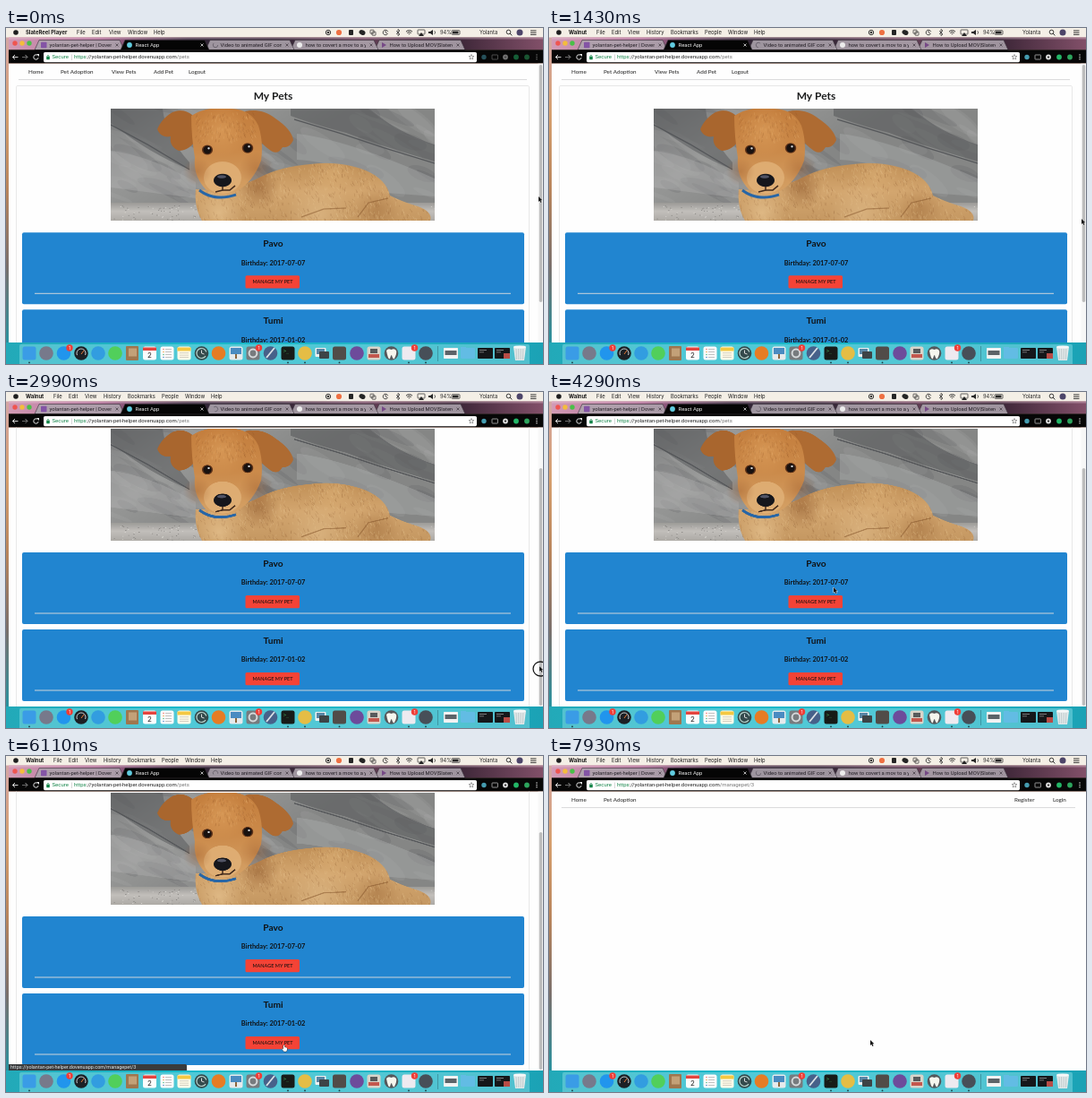
Write an HTML page with a canvas that moves like this. It is 600 by 375 pixels and loops after 8 s.

```html
<!DOCTYPE html>
<html lang="en">
<head>
<meta charset="utf-8">
<title>My Pets</title>
<style>
html, body { margin: 0; width: 100%; height: 100%; overflow: hidden; background: #fff; }
canvas { display: block; width: 600px; height: 375px; }
</style>
</head>
<body>
<canvas id="stage"></canvas>
<script>
const W = 600, H = 375, LOOP = 8000, STEP = 130;
const stage = document.getElementById('stage');
const dpr = window.devicePixelRatio || 1;
stage.width = W * dpr;
stage.height = H * dpr;
let c = stage.getContext('2d');

const UI = 'Inter, "Open Sans", sans-serif';
const WEB = 'Roboto, Arial, sans-serif';
const LATO = 'Lato, sans-serif';
const HOST = 'https://yolantan-pet-helper.dovenuapp.com';

function rect(x, y, w, h, fill) { c.fillStyle = fill; c.fillRect(x, y, w, h); }
function round(x, y, w, h, r, fill, stroke) {
  c.beginPath();
  c.roundRect(x, y, w, h, r);
  if (fill) { c.fillStyle = fill; c.fill(); }
  if (stroke) { c.strokeStyle = stroke; c.lineWidth = 0.7; c.stroke(); }
}
function dot(x, y, r, fill) {
  c.fillStyle = fill;
  c.beginPath();
  c.arc(x, y, r, 0, 7);
  c.fill();
}
function oval(x, y, rx, ry, turn, fill) {
  c.fillStyle = fill;
  c.beginPath();
  c.ellipse(x, y, rx, ry, turn, 0, 7);
  c.fill();
}
function line(pts, color, w = 1) {
  c.strokeStyle = color;
  c.lineWidth = w;
  c.beginPath();
  for (let i = 0; i < pts.length; i += 2) c.lineTo(pts[i], pts[i + 1]);
  c.stroke();
}
function arc(x, y, r, from, to, color, w = 1) {
  c.strokeStyle = color;
  c.lineWidth = w;
  c.beginPath();
  c.arc(x, y, r, from, to);
  c.stroke();
}
function shape(path, fill) { c.fillStyle = fill; c.fill(new Path2D(path)); }
function text(s, x, y, font, color, align = 'left') {
  c.font = font;
  c.fillStyle = color;
  c.textAlign = align;
  c.textBaseline = 'middle';
  c.fillText(s, x, y);
  return c.measureText(s).width;
}
function blend(x0, y0, x1, y1, ...colors) {
  const g = c.createLinearGradient(x0, y0, x1, y1);
  colors.forEach((k, i) => g.addColorStop(i / (colors.length - 1), k));
  return g;
}
function glow(x, y, r, rgb, a) {
  const g = c.createRadialGradient(x, y, 0, x, y, r);
  g.addColorStop(0, `rgba(${rgb},${a})`);
  g.addColorStop(1, `rgba(${rgb},0)`);
  rect(x - r, y - r, 2 * r, 2 * r, g);
}

// Puppy picture, painted once
function paintPhoto() {
  const pic = document.createElement('canvas'), k = 2;
  pic.width = 362 * k;
  pic.height = 125 * k;
  const main = c;
  c = pic.getContext('2d');
  c.scale(k, k);
  c.translate(-117, -90);
  let seed = 11;
  const rnd = () => (seed = seed * 16807 % 2147483647) / 2147483647;

  rect(117, 90, 362, 125, blend(117, 90, 200, 215, '#777879', '#969796', '#858685'));
  for (let i = 0; i < 80; i++) {
    const tone = rnd() < 0.5 ? '65,66,68' : '186,187,187';
    oval(117 + rnd() * 362, 90 + rnd() * 105, 10 + rnd() * 25, 2 + rnd() * 7, 0.15 + rnd() * 0.6, `rgba(${tone},.13)`);
  }
  shape('M117 90L175 90Q178 120 205 150L205 158Q160 140 117 106Z', 'rgba(90,91,94,.55)');
  shape('M117 137Q160 142 212 172L212 190L117 178Z', 'rgba(175,176,175,.4)');
  shape('M318 90L405 90Q440 118 479 130L479 149Q420 132 380 117Q345 108 318 98Z', 'rgba(80,82,85,.5)');
  shape('M325 118Q380 124 479 168L479 188L425 184Q380 150 325 147Z', 'rgba(172,174,174,.4)');
  line([117, 108, 158, 130, 205, 158], '#55575a', 1.3);
  line([322, 102, 375, 118, 420, 133, 479, 151], '#55575a', 1.3);
  line([405, 90, 440, 117, 479, 131], '#6a6b6d', 1);
  rect(117, 195, 362, 20, blend(0, 194, 0, 215, '#979693', '#c2bfbb', '#aeaba6'));
  for (let i = 0; i < 260; i++) rect(117 + rnd() * 362, 197 + rnd() * 18, 1.2, 0.8, rnd() < 0.5 ? '#d8d6d2' : '#858380');

  const body = 'M212 180Q210 200 219 215L474 215Q477 205 460 199Q443 194 429 187Q425 169 402 159Q373 148 340 152Q306 155 285 166Q250 184 212 180Z';
  shape(body, blend(0, 150, 0, 215, '#c08f56', '#d3a66f', '#c59862'));
  c.save();
  c.clip(new Path2D(body));
  glow(238, 206, 27, '230,194,143', 0.75);
  glow(282, 178, 24, '135,80,36', 0.5);
  glow(350, 209, 38, '230,195,145', 0.55);
  glow(415, 203, 27, '157,105,56', 0.45);
  glow(365, 163, 28, '222,178,120', 0.55);
  for (let i = 0; i < 850; i++) {
    const x = 210 + rnd() * 265, y = 150 + rnd() * 65;
    line([x, y, x + rnd() * 4 - 1, y + 2 + rnd() * 3], rnd() < 0.5 ? 'rgba(235,203,153,.35)' : 'rgba(130,82,40,.25)', 0.6);
  }
  c.restore();
  line([330, 211, 355, 202, 380, 201], 'rgba(130,82,40,.5)', 1.2);
  line([427, 190, 405, 195, 393, 211], 'rgba(130,82,40,.5)', 1.2);

  shape('M208 97Q198 89 186 94Q174 101 169 113Q173 123 184 121Q182 132 193 137Q205 137 214 123Z', '#a9662e');
  shape('M267 93Q286 89 301 101Q319 113 321 125Q317 134 309 133Q304 142 296 137Q283 128 278 117Z', '#ae6b32');
  shape('M207 98Q224 87 247 90Q273 89 282 109Q288 127 285 148Q276 172 258 182Q241 191 223 180Q209 165 211 145Q207 120 207 98Z', blend(0, 90, 0, 185, '#c47e3d', '#cb8a4a', '#d5a267'));
  glow(241, 115, 28, '222,160,93', 0.65);
  oval(242, 167, 21, 18, 0, 'rgba(225,177,119,.85)');
  glow(214, 160, 16, '159,92,43', 0.4);
  glow(280, 157, 19, '159,92,43', 0.4);
  oval(225, 136, 6, 5.4, 0, '#5d3219');
  oval(270, 134, 6.2, 5.6, 0, '#5d3219');
  dot(225, 136, 4.5, '#18110f');
  dot(270, 134, 4.7, '#18110f');
  dot(226.5, 134.3, 1.2, '#d7d9dc');
  dot(271.5, 132.3, 1.2, '#d7d9dc');
  oval(242, 170, 10, 7.3, 0, '#15161c');
  oval(241, 166, 5, 1.8, 0, '#515465');
  line([242, 177, 242, 181, 234, 183], '#432b1d', 1.5);
  line([242, 181, 250, 181, 256, 176], '#432b1d', 1.5);
  for (let i = 0; i < 190; i++) {
    const x = 213 + rnd() * 65, y = 94 + rnd() * 32;
    line([x, y, x + (x - 242) * 0.05, y + 3], rnd() < 0.5 ? 'rgba(237,190,125,.3)' : 'rgba(135,76,32,.25)', 0.6);
  }
  c.strokeStyle = '#2866a6';
  c.lineWidth = 3;
  c.stroke(new Path2D('M216 181Q233 194 257 186'));
  c = main;
  return pic;
}
const photo = paintPhoto();

function menuBar(front) {
  rect(0, 0, W, 10.5, '#f4efe6');
  dot(11, 5, 2.8, '#1d1d1d');
  const items = front
    ? [['File', 53], ['Edit', 70], ['View', 88], ['History', 109], ['Bookmarks', 136], ['People', 174], ['Window', 200], ['Help', 229]]
    : [['File', 79], ['Edit', 96], ['View', 115], ['Window', 136], ['Help', 165]];
  text(front ? 'Walnut' : 'SlateReel Player', 22, 5.3, `bold 5.9px ${UI}`, '#151515');
  for (const [s, x] of items) text(s, x, 5.3, `5.8px ${UI}`, '#1c1c1c');
  const ink = '#252525';
  arc(360, 5, 2.7, 0, 7, ink, 0.9);
  dot(360, 5, 1.3, ink);
  dot(372, 5, 3.1, '#ee7042');
  round(383, 2, 5, 6, 1, ink);
  oval(398, 5, 3.6, 2.7, 0.4, ink);
  round(407, 2.2, 4, 4, 0.5, null, ink);
  round(409, 4.2, 4, 4, 0.5, null, ink);
  arc(424, 5, 2.8, 0.4, 6, ink, 0.8);
  line([424, 3, 424, 5, 426, 6], ink, 0.7);
  line([436, 3.2, 440, 7, 438, 8.6, 438, 1.4, 440, 3, 436, 7], ink, 0.7);
  for (let r = 1; r < 6; r += 2) arc(450.5, 7.7, r, -2.35, -0.8, ink, 1);
  round(460, 2, 8, 5, 0.7, null, ink);
  shape('M464 5L467 9L461 9Z', ink);
  shape('M472 4L474 4L477 2L477 8L474 6L472 6Z', ink);
  arc(477, 5, 2.5, -0.8, 0.8, ink, 0.7);
  text('94%', 485, 5.3, `5.7px ${UI}`, ink);
  round(498, 2.7, 9, 4.6, 0.8, null, ink);
  rect(499, 3.6, 6.5, 2.8, ink);
  text('Yolanta', 529, 5.3, `5.8px ${UI}`, ink);
  arc(561.5, 4.5, 2.3, 0, 7, ink, 0.9);
  line([563.2, 6.2, 565.3, 8.4], ink, 1);
  dot(574, 5, 3.5, '#4d4569');
  for (let i = 0; i < 3; i++) rect(586, 2.5 + i * 2.2, 6.5, 0.9, ink);
}

function tab(x, w, label, active) {
  c.beginPath();
  c.moveTo(x - 2, 24.5);
  c.lineTo(x + 3, 13.5);
  c.lineTo(x + w - 3, 13.5);
  c.lineTo(x + w + 2, 24.5);
  c.closePath();
  c.fillStyle = active ? '#050505' : 'rgba(174,164,174,.88)';
  c.fill();
  c.strokeStyle = '#383039';
  c.lineWidth = 0.6;
  c.stroke();
  c.save();
  c.beginPath();
  c.rect(x, 12, w - 12, 13);
  c.clip();
  text(label, x + 14.5, 19, `5.9px ${WEB}`, active ? '#f0f0f0' : '#211c23');
  c.restore();
  const k = active ? '#ddd' : '#494149', cx = x + w - 6;
  line([cx - 1.5, 17.5, cx + 1.5, 20.5], k, 0.8);
  line([cx + 1.5, 17.5, cx - 1.5, 20.5], k, 0.8);
}

function browserBar(t, front, loading, path) {
  rect(3, 10.5, 597, 14, blend(3, 0, 600, 0, '#d29bb5', '#ae6b94', '#342738', '#302433', '#654057', '#392435', '#825069'));
  rect(3, 10.5, 597, 2, 'rgba(236,203,220,.35)');
  ['#ef5550', '#f4bc3c', '#4abf48'].forEach((k, i) => dot(10 + i * 8, 17, 2.7, k));
  tab(414, 97, 'How to Upload MOV|Slatereel');
  tab(320, 94, 'how to covert a mov to a youtube');
  tab(225, 95, 'Video to animated GIF converter');
  tab(34, 96, 'yolantan-pet-helper | Dovenu');
  tab(130, 95, 'React App', true);
  round(39, 15.8, 6.5, 6.5, 0.8, '#8454a5');
  if (loading) arc(138, 19, 2.7, t / 130, t / 130 + 4.1, '#e7e7e7', 1);
  else dot(138, 19, 2.9, '#61cce0');
  arc(234, 19, 2.7, t / 180, t / 180 + 4, '#68616c', 0.9);
  dot(328, 19, 3, '#ececec');
  shape('M420 16L425 19L420 22Z', '#764986');

  rect(3, 24.3, 597, 15.2, '#070707');
  line([13.5, 32.5, 7.5, 32.5, 10, 30, 7.5, 32.5, 10, 35], '#eee', 0.9);
  line([18, 32.5, 24, 32.5, 21.5, 30, 24, 32.5, 21.5, 35], '#777', 0.9);
  if (loading) {
    line([31, 30, 36, 35], '#eee', 0.9);
    line([36, 30, 31, 35], '#eee', 0.9);
  } else {
    arc(33.5, 32.5, 2.7, 0.2, 5.3, '#eee', 0.9);
    shape('M34 29L37 29L37 32Z', '#eee');
  }
  round(42, 27, 484, 11.2, 1.6, '#fff');
  round(45.2, 31.8, 3.6, 3.4, 0.4, '#16854a');
  arc(47, 31.7, 1.2, 3.14, 6.28, '#16854a', 0.7);
  text('Secure', 51.5, 32.7, `6px ${WEB}`, '#16854a');
  rect(73, 29.5, 0.6, 6.5, '#bbb');
  const font = `6px ${WEB}`;
  const w = text('https', 76, 32.7, font, '#16854a');
  const w2 = text(HOST.slice(5), 76 + w, 32.7, font, '#222');
  text(path, 76 + w + w2, 32.7, font, '#777');
  c.beginPath();
  for (let i = 0; i < 10; i++) {
    const a = i * Math.PI / 5 - Math.PI / 2, r = i % 2 ? 1.3 : 3;
    c.lineTo(520 + r * Math.cos(a), 32.5 + r * Math.sin(a));
  }
  c.closePath();
  c.strokeStyle = '#666';
  c.lineWidth = 0.6;
  c.stroke();
  c.globalAlpha = front ? 1 : 0.5;
  dot(534, 32.5, 2.7, '#459cb0');
  round(543, 30, 6.5, 5, 0.6, null, '#ccc');
  dot(558, 32.5, 2.9, '#ddd');
  dot(558, 32.5, 1, '#111');
  dot(570, 32.5, 2.9, '#23b667');
  dot(582, 32.5, 2.9, '#2da45d');
  for (let i = 0; i < 3; i++) dot(593, 30 + i * 2.4, 0.75, '#ddd');
  c.globalAlpha = 1;
}

function card(y, name, born) {
  round(18, y, 561, 80, 2, '#2185d0');
  text(name, 298.5, y + 12.5, `bold 10.2px ${LATO}`, '#101214', 'center');
  text('Birthday: ' + born, 298.5, y + 34, `bold 7.4px ${LATO}`, '#101214', 'center');
  round(267.5, y + 48, 60.5, 14.3, 1.5, '#f44336');
  text('MANAGE MY PET', 298, y + 55.4, `500 5.5px ${LATO}`, '#17100f', 'center');
  rect(32, y + 67.5, 532, 1, '#cdd5dc');
}

function nav(items, right) {
  for (const [s, x] of items) text(s, x, 49, `6.3px ${LATO}`, '#202020');
  rect(14, 57.2, right - 14, 0.9, '#d4d4d5');
}

function page(scroll, blank) {
  c.save();
  c.beginPath();
  c.rect(3, 39.5, 597, 311.5);
  c.clip();
  rect(3, 39.5, 597, 312, '#fefefe');
  if (blank) {
    nav([['Home', 25], ['Pet Adoption', 61], ['Register', 520], ['Login', 563]], 588);
  } else {
    c.translate(0, -scroll);
    nav([['Home', 25], ['Pet Adoption', 61], ['View Pets', 118], ['Add Pet', 165], ['Logout', 204]], 582);
    round(11.5, 64.5, 573, 350, 1.5, null, '#dededf');
    text('My Pets', 298.5, 76.8, `bold 12px ${LATO}`, '#1b1c1d', 'center');
    c.drawImage(photo, 117, 90, 362, 125);
    card(228.3, 'Pavo', '2017-07-07');
    card(314.3, 'Tumi', '2017-01-02');
    c.translate(0, scroll);
    rect(594.5, 39.5, 5.5, 312, '#f7f7f7');
    round(595.8, 41 + scroll * 0.89, 3.4, 265, 1.7, '#bcbcbc');
  }
  c.restore();
}

const sq = (x, k) => round(x - 7.5, 355.5, 15, 15, 2.5, k);
const disc = (x, k) => dot(x, 363, 7.8, k);
function badge(x) {
  dot(x, 357, 3.7, '#ef3d37');
  text('1', x, 357.2, `5px ${UI}`, '#fff', 'center');
}
function dock() {
  rect(0, 351, W, 24, blend(0, 0, 600, 0, '#23a9b8', '#19b9ca', '#20b6c6', '#1ba2b5'));
  round(15, 353, 570, 24, 2, 'rgba(125,216,226,.55)');
  sq(26, '#3a9ce6');
  disc(45, '#77798b');
  disc(64.5, '#2195ed');
  badge(71);
  disc(84, '#1c2025');
  arc(84, 363, 5, 2.7, 6.7, '#cbd0d2', 1);
  line([84, 364, 87, 360], '#e97935', 1);
  disc(103, '#329de0');
  disc(122, '#51cf5b');
  round(134, 355, 14, 16, 1, '#9f764e');
  rect(137, 357.5, 9, 9, '#c3a178');
  sq(160.5, '#fcfcfc');
  rect(153, 356.5, 15, 3.5, '#e4443e');
  text('2', 160.5, 365.5, `8px ${UI}`, '#222', 'center');
  sq(180, '#fbfbfb');
  for (let i = 0; i < 4; i++) {
    dot(176, 358.5 + i * 3, 0.8, ['#e77', '#ea5', '#5b8', '#58c'][i]);
    rect(178, 358 + i * 3, 7, 0.7, '#aaa');
  }
  sq(199, '#fffbe9');
  rect(191.5, 356.5, 15, 4, '#f4c842');
  for (let i = 0; i < 3; i++) rect(194, 362.5 + i * 2.3, 10, 0.6, '#b8b3a6');
  disc(218.5, '#344a4c');
  arc(218.5, 363, 5.5, 0.6, 6, '#b8d5ce', 1.2);
  line([218.5, 359.5, 218.5, 363, 221.5, 364], '#eee', 0.9);
  disc(237.5, '#e67c24');
  sq(257, '#e6eaec');
  rect(251, 357, 12, 7, '#4a8bc1');
  rect(256, 364, 2, 5, '#8c673f');
  sq(276, '#777b7e');
  arc(276, 363, 4.4, 0, 7, '#d5d8da', 2);
  badge(282.5);
  disc(295.5, '#47618a');
  line([291, 368, 300, 357], '#dce2e6', 1.8);
  sq(315, '#171b18');
  text('>_', 310, 360.5, '5px "DejaVu Sans Mono", monospace', '#4cbd67');
  disc(334, '#e5bd45');
  round(345.5, 357, 12, 10, 1, '#f1f1f1');
  rect(347, 358, 9, 6, '#5a87a6');
  round(350, 361, 11, 8, 1, '#3d4447');
  sq(372.5, '#514c48');
  disc(392, '#6d4b9b');
  sq(411, '#d9d4c9');
  rect(405, 364, 12, 4, '#c3574d');
  rect(407, 358, 8, 5, '#585b5c');
  disc(430.5, '#55585b');
  shape('M425 360Q427 357 430.5 359Q434 357 436 360Q437 363 434 369Q432 370 431 365Q430 365 429 369Q427 371 425 360Z', '#f6f6ee');
  sq(450, '#eeeaf0');
  badge(456.5);
  disc(469, '#474f58');
  rect(482.3, 355, 0.7, 17, 'rgba(30,75,82,.55)');
  round(489, 357, 16, 12, 0.7, '#f2f2f2');
  rect(490.5, 360, 13, 5, '#5c6368');
  round(508, 357, 16, 12, 1.2, '#62bce4');
  rect(508, 356, 6, 2, '#62bce4');
  for (const x of [527, 546]) {
    round(x, 357, 17, 12, 0.8, '#15171a');
    rect(x + 2, 359, 8, 0.7, '#aaa');
    rect(x + 2, 361.5, 5, 0.7, '#999');
  }
  rect(556, 363, 7, 6, '#b84c46');
  shape('M567 356L581 356L579 371L569 371Z', '#e2e9ea');
  oval(574, 356, 7, 1.6, 0, '#f6f8f8');
  for (let i = 0; i < 4; i++) line([570 + i * 2.6, 358, 570.5 + i * 2.3, 370], '#aab7b9', 0.6);
  for (const x of [26, 315, 334, 372.5, 450, 469]) dot(x, 373.4, 0.9, '#173d43');
}

// Pointer path: time, x, y
const path = [
  [0, 596, 191], [650, 596, 191], [1300, 596, 216], [1820, 596, 216], [2730, 597, 309],
  [3250, 597, 309], [4160, 319, 221], [4550, 319, 221], [5590, 310, 326],
  [6760, 310, 326], [7410, 360, 320], [LOOP, 360, 320]
];
function pointerAt(t) {
  const i = path.findIndex(p => p[0] > t);
  const [t0, x0, y0] = path[i - 1], [t1, x1, y1] = path[i];
  const u = (t - t0) / (t1 - t0), e = u * u * (3 - 2 * u);
  return [x0 + (x1 - x0) * e, y0 + (y1 - y0) * e];
}
function pointer(x, y, hand, pressed) {
  if (pressed) arc(x, y, 8, 0, 7, '#171717', 1.3);
  c.save();
  c.translate(x - 1, y - 3);
  const p = new Path2D(hand
    ? 'M1 0Q2 -1 2.3 0L2.3 2L4.7 2.6Q5.5 3 5 5L4.3 6.8L1.5 6.8L-.8 4Q-.5 3 .8 4Z'
    : 'M0 0L0 6L1.4 4.7L2.4 7L3.5 6.5L2.5 4.3L4.3 4.3Z');
  c.strokeStyle = hand ? '#222' : '#fff';
  c.lineWidth = 0.9;
  c.stroke(p);
  c.fillStyle = hand ? '#fff' : '#111';
  c.fill(p);
  c.restore();
}

function draw(t) {
  const front = t >= 650, clicked = t >= 6760, blank = t >= 7800;
  const [x, y] = pointerAt(t);
  const dragY = t < 1820 ? 216 : t > 2730 ? 309 : y;
  const scroll = Math.min(49.3, Math.max(0, (dragY - 216) * 1.12));
  const over = x > 267 && x < 328 && t > 4160
    ? [[227, 1], [313, 3]].find(([top]) => y > top && y < top + 15) : null;

  c.setTransform(dpr, 0, 0, dpr, 0, 0);
  rect(0, 0, W, H, blend(0, 10, 0, 351, '#d4a6a5', '#d7a06e', '#b9855c', '#7b706c', '#29929f'));
  menuBar(front);
  dock();
  browserBar(t, front, clicked && !blank, clicked ? '/managepet/3' : '/pets');
  page(scroll, blank);
  if (over && !clicked) {
    round(3, 344, 199, 7, [0, 1.5, 0, 0], '#393b3d');
    text(HOST + '/managepet/' + over[1], 5, 347.8, `5.5px ${WEB}`, '#e8e8e8');
  }
  const pressed = t >= 1690 && t < 3200 || t >= 6500 && t < 6760;
  pointer(x, y, !blank && (over || clicked), pressed);
}

function tick(now) {
  const t = now % LOOP;
  draw(Math.floor(t / STEP) * STEP);
  requestAnimationFrame(tick);
}
draw(0);
requestAnimationFrame(tick);
</script>
</body>
</html>
```
